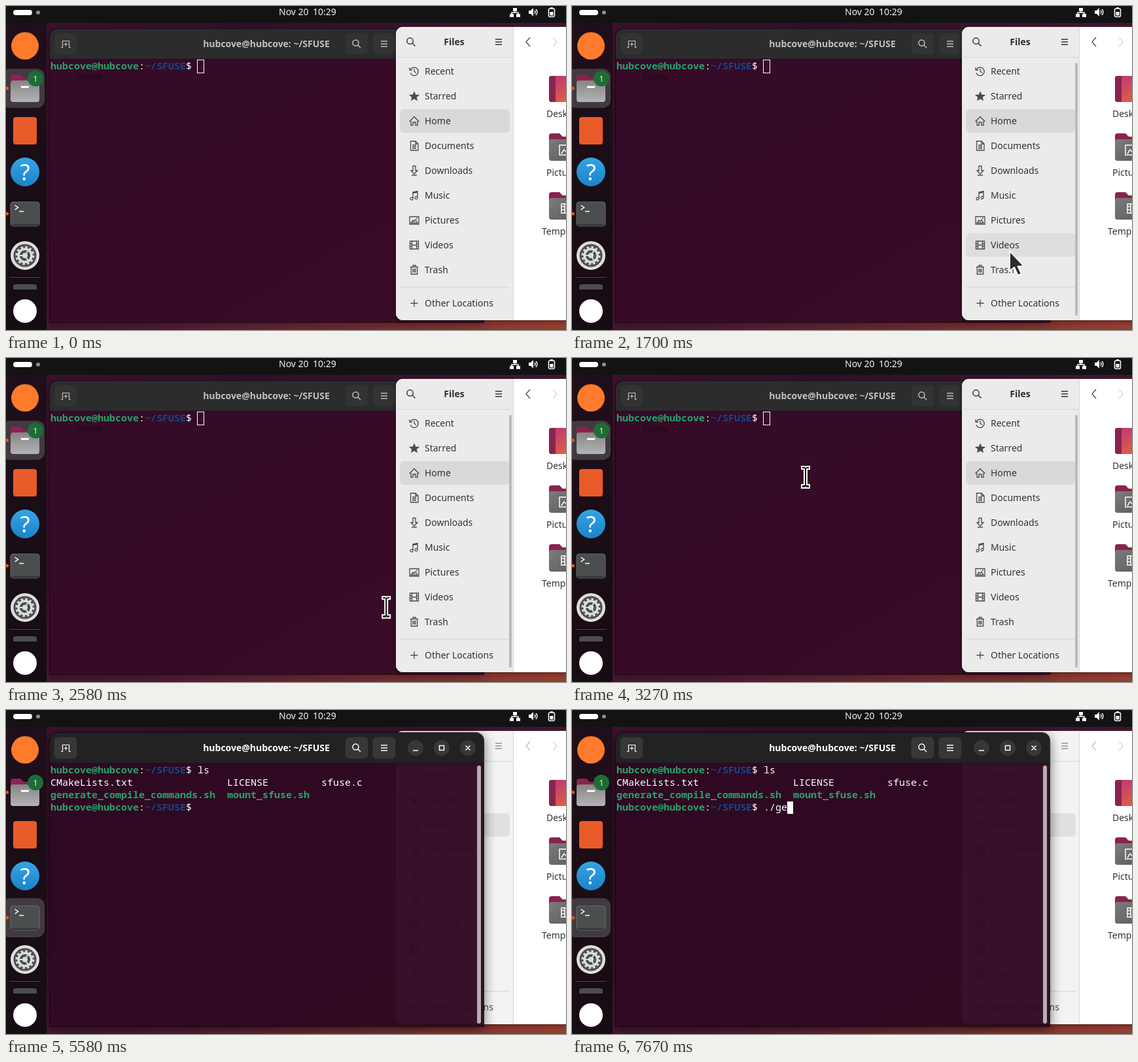
Animation of 856 by 496 pixels, one loop 8000 ms. Source, as an HTML page:

```html
<!DOCTYPE html>
<html lang="en">
<head>
<meta charset="utf-8">
<title>Terminal session</title>
<style>
html, body { margin: 0; width: 100%; height: 100%; overflow: hidden; background: #131313; }
svg { display: block; width: 856px; height: 496px; }
text { font: 14px "Noto Sans", "Open Sans", sans-serif; white-space: pre; }
.b { font-weight: 700; }
.m { text-anchor: middle; }
.mono text { font: 15px "Noto Sans Mono", "DejaVu Sans Mono", monospace; fill: #fff; }
.mono .g { fill: #26a269; font-weight: 700; }
.mono .p { fill: #12488b; font-weight: 700; }
.line { fill: none; stroke: #4a4a4a; stroke-width: 1.3; }
.wl { fill: none; stroke: #fff; stroke-width: 1.5; }
</style>
</head>
<body>
<svg viewBox="0 0 856 496">
  <defs>
    <linearGradient id="wall" x1="0" y1="0" x2="1" y2="1">
      <stop offset="0" stop-color="#42122f"/><stop offset=".25" stop-color="#35102d"/>
      <stop offset=".6" stop-color="#4b1836"/><stop offset="1" stop-color="#96402f"/>
    </linearGradient>
    <linearGradient id="dockBg" x1="0" y1="0" x2="0" y2="1">
      <stop offset="0" stop-color="#1f0f1a"/><stop offset="1" stop-color="#160c14"/>
    </linearGradient>
    <linearGradient id="grey" x1="0" y1="0" x2="0" y2="1">
      <stop offset="0" stop-color="#858585"/><stop offset="1" stop-color="#b4b4b4"/>
    </linearGradient>
    <linearGradient id="dark" x1="0" y1="0" x2="1" y2="1">
      <stop offset="0" stop-color="#7c7c7c"/><stop offset="1" stop-color="#5a5a5a"/>
    </linearGradient>
    <linearGradient id="desk" gradientUnits="userSpaceOnUse" x1="838" y1="107" x2="862" y2="147">
      <stop offset="0" stop-color="#b83a78"/><stop offset="1" stop-color="#e8603f"/>
    </linearGradient>
    <linearGradient id="blue" x1="0" y1="0" x2="0" y2="1">
      <stop offset="0" stop-color="#36a3e2"/><stop offset="1" stop-color="#1c84ca"/>
    </linearGradient>
    <filter id="shadow" x="-10%" y="-10%" width="120%" height="120%">
      <feDropShadow dx="0" dy="2" stdDeviation="4" flood-opacity=".4"/>
    </filter>
    <filter id="outer" x="-10%" y="-10%" width="120%" height="120%">
      <feGaussianBlur in="SourceAlpha" stdDeviation="9"/>
      <feOffset dy="3"/>
      <feComposite operator="out" in2="SourceAlpha"/>
    </filter>
  </defs>

  <rect width="856" height="496" fill="url(#wall)"/>

  <g id="windows">
    <g id="term">
      <path id="termShadow" d="M67 484V47a12 12 0 0 1 12-12H718a12 12 0 0 1 12 12V484Z" filter="url(#outer)"/>
      <path d="M67 484V47a12 12 0 0 1 12-12H718a12 12 0 0 1 12 12V484Z" fill="none" stroke="#14060f" stroke-opacity=".8" stroke-width="2"/>
      <rect id="body" x="67" y="81" width="663" height="403" fill-opacity=".96"/>
      <path d="M330 352Q435 368 550 344Q545 362 440 364Q350 364 330 352ZM365 318Q430 280 515 316Q430 300 365 318Z" fill="#000" opacity=".04"/>
      <text x="108" y="113" opacity=".4">Home</text>
      <path id="head" d="M67 81V47a12 12 0 0 1 12-12H718a12 12 0 0 1 12 12V81Z"/>
      <path d="M67 81.5H730" stroke="#151515"/>
      <g id="tools">
        <g fill="#373737">
          <g stroke="#2a2a2a">
            <rect x="73.5" y="41.5" width="35" height="33" rx="6"/>
            <rect x="518.5" y="41.5" width="35" height="33" rx="6"/>
            <rect x="560.5" y="41.5" width="35" height="33" rx="6"/>
          </g>
          <circle cx="626" cy="58" r="12"/><circle cx="666" cy="58" r="12"/><circle cx="706" cy="58" r="12"/>
        </g>
        <g class="wl">
          <path d="M84 63.5H86.5V53.5H96.5V63.5H99M91.5 55.5V61.5M88.5 58.5H94.5" stroke-width="1.2"/>
          <circle cx="534.5" cy="56.5" r="4.5"/><path d="M538 60L542 64"/>
          <path d="M573 54H583M573 58H583M573 62H583"/>
          <path d="M622 62H630M662.5 54.5H669.5V61.5H662.5ZM702.5 54.5L709.5 61.5M709.5 54.5L702.5 61.5"/>
        </g>
        <text class="b m" x="398" y="63" fill="#fff">hubcove@hubcove: ~/SFUSE</text>
      </g>
      <g class="mono" id="screen"></g>
      <rect id="caret" height="19"/>
      <rect id="termBar" x="720" y="85" width="6" height="395" rx="3" fill="#b5adb2"/>
    </g>

    <g id="files">
      <rect x="596" y="32" width="290" height="449" rx="11" fill="#fff" filter="url(#shadow)"/>
      <path id="side" d="M775 32H607a11 11 0 0 0-11 11V470a11 11 0 0 0 11 11H775Z"/>
      <path d="M596 78.5H775M775.5 32V481M602 430.5H770" stroke="#d5d5d5" fill="none"/>
      <rect x="602" y="158" width="168" height="36" rx="6" fill-opacity=".08"/>
      <rect id="hover" x="602" width="168" height="36" rx="6" fill-opacity=".055"/>
      <g id="filesHead">
        <g class="line" style="stroke:#333;stroke-width:1.5">
          <circle cx="617.5" cy="53.5" r="4.7"/><path d="M621 57L625.5 61.5M748 51H758M748 55H758M748 59H758"/>
        </g>
        <text class="b m" x="685" y="60" fill="#2e2e2e">Files</text>
      </g>
      <path id="back" class="line" d="M801 48L795 55L801 62"/>
      <path class="line" d="M836 48L842 55L836 62" style="stroke:#d8d8d8"/>
      <g id="places"></g>
      <rect id="filesBar" x="769" y="87" width="4" height="387" rx="2" fill="#bababa"/>
      <g id="folders"></g>
    </g>
  </g>

  <g id="dock">
    <rect y="26" width="62" height="470" fill="url(#dockBg)"/>
    <rect id="glow" x="-6" width="65" height="60" rx="12" fill="#423a40"/>
    <circle cx="29" cy="61" r="21" fill="#ff7a2b"/>
    <path d="M7 143V109a4 4 0 0 1 4-4H22L27 110H47a4 4 0 0 1 4 4V143Z" fill="#8a2351"/>
    <rect x="7" y="114" width="44" height="33" rx="4" fill="url(#grey)"/>
    <path d="M23 124H35" stroke="#fff" stroke-width="3"/>
    <circle cx="45" cy="111" r="12" fill="#1d6d38"/>
    <text class="m" x="45" y="116" fill="#ffe9a8" style="font-size:13px">1</text>
    <rect x="11" y="170" width="36" height="42" rx="4" fill="#e95a29"/>
    <circle cx="29" cy="254" r="22" fill="url(#blue)"/>
    <text class="m" x="29" y="267" fill="#fff" style="font-size:35px">?</text>
    <rect x="7" y="300" width="44" height="37" rx="4" fill="#4b4e4f" stroke="#6a6d6e"/>
    <path d="M8 335.5H50" stroke="#2f3132" stroke-width="2"/>
    <path class="wl" d="M13.5 305L18.5 308.5L13.5 312M20 314.5H27"/>
    <g transform="translate(29 382)">
      <circle r="22" fill="#dedede"/><circle r="17.5" fill="#4d4f50"/>
      <g fill="none" stroke="#dedede">
        <circle r="13" stroke-width="3" stroke-dasharray="3.4 3.4"/><circle r="10" stroke-width="3.5"/>
        <path d="M0 0H-10M0 0L5-8.5M0 0L5 8.5" stroke-width="2"/>
      </g>
      <circle r="4" fill="#dedede"/>
    </g>
    <path d="M5 415.5H53" stroke="#4b4348"/>
    <path d="M11 434V430a4 4 0 0 1 4-4H43a4 4 0 0 1 4 4V434Z" fill="#4b4d4e"/>
    <circle cx="29" cy="467" r="18" fill="#fff"/>
    <circle cx="1.5" cy="126" r="2.5" fill="#e95420"/><circle cx="1.5" cy="318" r="2.5" fill="#e95420"/>
  </g>

  <g id="panel">
    <rect width="856" height="26" fill="#131313"/>
    <rect x="11" y="6" width="29" height="8" rx="4" fill="#fff"/><circle cx="49" cy="10" r="3" fill="#8b8b8b"/>
    <text x="417" y="14" fill="#f2f2f2">Nov 20</text><text x="469" y="14" fill="#f2f2f2">10:29</text>
    <path d="M775 3H781V8H775ZM770 12H776V17H770ZM780 12H786V17H780Z" fill="#fff"/>
    <path class="wl" d="M778 8V10H773V12M778 10H783V12" stroke-width="1.2"/>
    <path d="M799 7H802L806 3V16L802 12H799Z" fill="#fff"/>
    <path class="wl" d="M808 7Q810 9.5 808 12M810 5Q814 9.5 810 14" stroke-width="1.2"/>
    <rect class="wl" x="829.5" y="4" width="9" height="12.5" rx="2"/><path d="M832 2H836V4H832ZM831.5 9H836.5V14.5H831.5Z" fill="#fff"/>
  </g>

  <path id="arrow" d="M0 0V31L7 25L12.5 37.5L18 35L12.5 23.5H22Z" fill="#2b2b2b" stroke="#fff" stroke-width="2" stroke-linejoin="round"/>
  <path id="beam" d="M-6-16H-1.5L0-15L1.5-16H6V-12H2V12H6V17H1.5L0 16L-1.5 17H-6V12H-2V-12H-6Z" fill="#111" stroke="#fff" stroke-width="2"/>
</svg>

<script>
const LOOP = 8000, FOCUS = 3500;
const $ = id => document.getElementById(id);
const show = (id, on) => $(id).setAttribute("opacity", +on);
const attr = (id, props) => { for (const k in props) $(id).setAttribute(k, props[k]); };
const ramp = (t, a, b) => Math.min(1, Math.max(0, (t - a) / (b - a)));

const places = [
  ["Recent", "M-5.5-3A6.3 6.3 0 1 1-6 2.5M-7-6V-2H-3M0-4V0L3 2.5"],
  ["Starred", "M0-6L1.8-1.8L6.5-1.5L3 1.5L4 6L0 3.5L-4 6L-3 1.5L-6.5-1.5L-1.8-1.8Z", 1],
  ["Home", "M-7.5 1L0-6.5L7.5 1M-5 0V6.5H-2V2H2V6.5H5V0"],
  ["Documents", "M-5.5-7H2L6-3V7H-5.5ZM2-7V-3H6M-3-1H3M-3 1.5H3M-3 4H3"],
  ["Downloads", "M-2-7H2V0H5L0 5L-5 0H-2ZM-4 7H4"],
  ["Music", "M-2 5A2 2 0 1 1-2 4.9V-5L5-6.5V3.5A2 2 0 1 1 5 3.4M-2-3.5L5-5"],
  ["Pictures", "M-7-5.5H7V6H-7ZM-5 4L-2 0L0 2L2-1L5 4ZM3-3H5"],
  ["Videos", "M-6.5-6H6.5V6H-6.5ZM-3.5-6V6M3.5-6V6M-6.5-2H-3.5M-6.5 2H-3.5M3.5-2H6.5M3.5 2H6.5M-3.5 0H3.5"],
  ["Trash", "M-6-4.5H6M-2-4.5V-7H2V-4.5M-4.7-4.5V6.5H4.7V-4.5M-2-2V4M0-2V4M2-2V4"],
  ["Other Locations", "M-5.5 0H5.5M0-5.5V5.5"]
];
const rowY = i => i < 9 ? 100 + 38 * i : 455;
$("places").innerHTML = places.map(([name, d, solid], i) =>
  `<path class="line" transform="translate(624 ${rowY(i)})" d="${d}"${solid ? ' style="fill:#4a4a4a"' : ""}/>
   <text x="640" y="${rowY(i) + 5}" fill="#333">${name}</text>`).join("");

const label = (x, y, name) => `<text x="${x}" y="${y}" fill="#333">${name}</text>`;
const folder = (y, glyph) =>
  `<path d="M830 ${y + 25}V${y + 4}a4 4 0 0 1 4-4H846L851 ${y + 5}H880V${y + 25}Z" fill="#8a2351"/>
   <rect x="830" y="${y + 9}" width="50" height="33" rx="4" fill="url(#dark)"/>
   <path class="wl" d="${glyph}" stroke-width="1.2"/>`;
$("folders").innerHTML =
  `<rect x="830" y="107" width="50" height="40" rx="4" fill="url(#desk)"/>
   <path d="M834 107H840V147H834a4 4 0 0 1-4-4V111a4 4 0 0 1 4-4Z" fill="#8a2351"/>` +
  label(826, 170, "Desktop") +
  folder(195, "M846 213H866V228H846ZM849 226L853 220L856 223L860 218") + label(826, 260, "Pictures") +
  folder(285, "M849 303V317H854V303ZM854 303H866V317H854M849 307H854M849 312H854") + label(819, 350, "Templates");

// Terminal text on a 9 x 19 grid
const put = (col, row, str, cls = "") =>
  `<text class="${cls}" x="${68 + 9 * col}" y="${97 + 19 * row}">${str}</text>`;
const prompt = (row, typed) => put(0, row, "hubcove@hubcove", "g") + put(15, row, ":") +
  put(16, row, "~/SFUSE", "p") + put(23, row, "$ " + typed);
const listing = put(0, 1, "CMakeLists.txt") + put(30, 1, "LICENSE") + put(46, 1, "sfuse.c") +
  put(0, 2, "generate_compile_commands.sh", "g") + put(30, 2, "mount_sfuse.sh", "g");
const count = (t, times) => times.filter(k => t >= k).length;

let last = "";
function drawScreen(t) {
  const first = "ls".slice(0, count(t, [4680, 4930]));
  const second = "./ge".slice(0, count(t, [6750, 6930, 7160, 7670]));
  const done = t >= 5030, entered = t >= 4980;
  const html = prompt(0, first) + (done ? listing + prompt(3, second) : "");
  if (html !== last) $("screen").innerHTML = last = html;

  const col = done ? 25 + second.length : entered ? 0 : 25 + first.length;
  const row = done ? 3 : entered ? 1 : 0;
  const active = t >= FOCUS;
  attr("caret", {
    x: 68 + 9 * col - (active ? 0 : .5), y: 83 + 19 * row - (active ? 0 : .5),
    width: active ? 9 : 10, height: active ? 19 : 20,
    fill: active ? "#fff" : "none", stroke: active ? "none" : "#fff"
  });
  show("caret", !(t >= 4040 && t < 4480 || t >= 5580 && t < 6190));
}

// Pointer hot spot: time, x, y
const path = [
  [1030, 786, 478], [1120, 735, 415], [1210, 702, 382], [1300, 688, 371], [1460, 688, 371],
  [1580, 676, 373], [1700, 669, 375], [1950, 668, 372], [2210, 669, 364], [2270, 669, 364],
  [2430, 655, 441], [2560, 600, 400], [2750, 430, 230], [2900, 357, 182], [3140, 357, 182],
  [3170, 349, 184], [3260, 349, 184], [3270, 357, 182]
];
function pointerAt(t) {
  const i = path.findIndex(p => p[0] > t);
  if (i < 0) return path[path.length - 1].slice(1);
  if (i === 0) return path[0].slice(1);
  const a = path[i - 1], b = path[i], k = ramp(t, a[0], b[0]);
  return [a[1] + (b[1] - a[1]) * k, a[2] + (b[2] - a[2]) * k];
}

function drawPointer(t) {
  const [x, y] = pointerAt(t), on = t >= 1030 && t < 4680, text = x < 596;
  const at = { transform: `translate(${x} ${y})` };
  attr("arrow", at);
  attr("beam", at);
  show("arrow", on && !text);
  show("beam", on && text);
  const row = places.findIndex((_, i) => Math.abs(rowY(i) - y) <= 18);
  const over = t >= 1460 && !text && row >= 0;
  show("hover", over);
  if (over) attr("hover", { y: rowY(row) - 18 });
}

function draw(t) {
  const active = t >= FOCUS;
  const top = $(active ? "term" : "files");
  if ($("windows").lastElementChild !== top) $("windows").append(top);
  attr("body", { fill: active ? "#2f0922" : "#370b27" });
  attr("head", { fill: active ? "#222" : "#2c2c2c" });
  show("tools", active ? 1 : .7);
  show("termShadow", active ? .6 : .3);
  attr("glow", { y: active ? 288 : 96 });
  show("termBar", active ? ramp(t, 3600, 3800) : 0);
  show("filesBar", ramp(t, 1430, 1600) * (1 - ramp(t, 4380, 4490)));
  attr("side", { fill: t < 3710 ? "#ebebeb" : t < 4250 ? "#f0f0f0" : "#f3f3f3" });
  show("filesHead", t < 4250 ? 1 : .5);
  show("back", t < 3710 ? 1 : t < 4250 ? .7 : .35);
  show("places", t < 4250 ? 1 : .85);
  drawScreen(t);
  drawPointer(t);
}

const start = performance.now();
function tick() {
  draw((performance.now() - start) % LOOP);
  requestAnimationFrame(tick);
}
tick();
</script>
</body>
</html>
```
